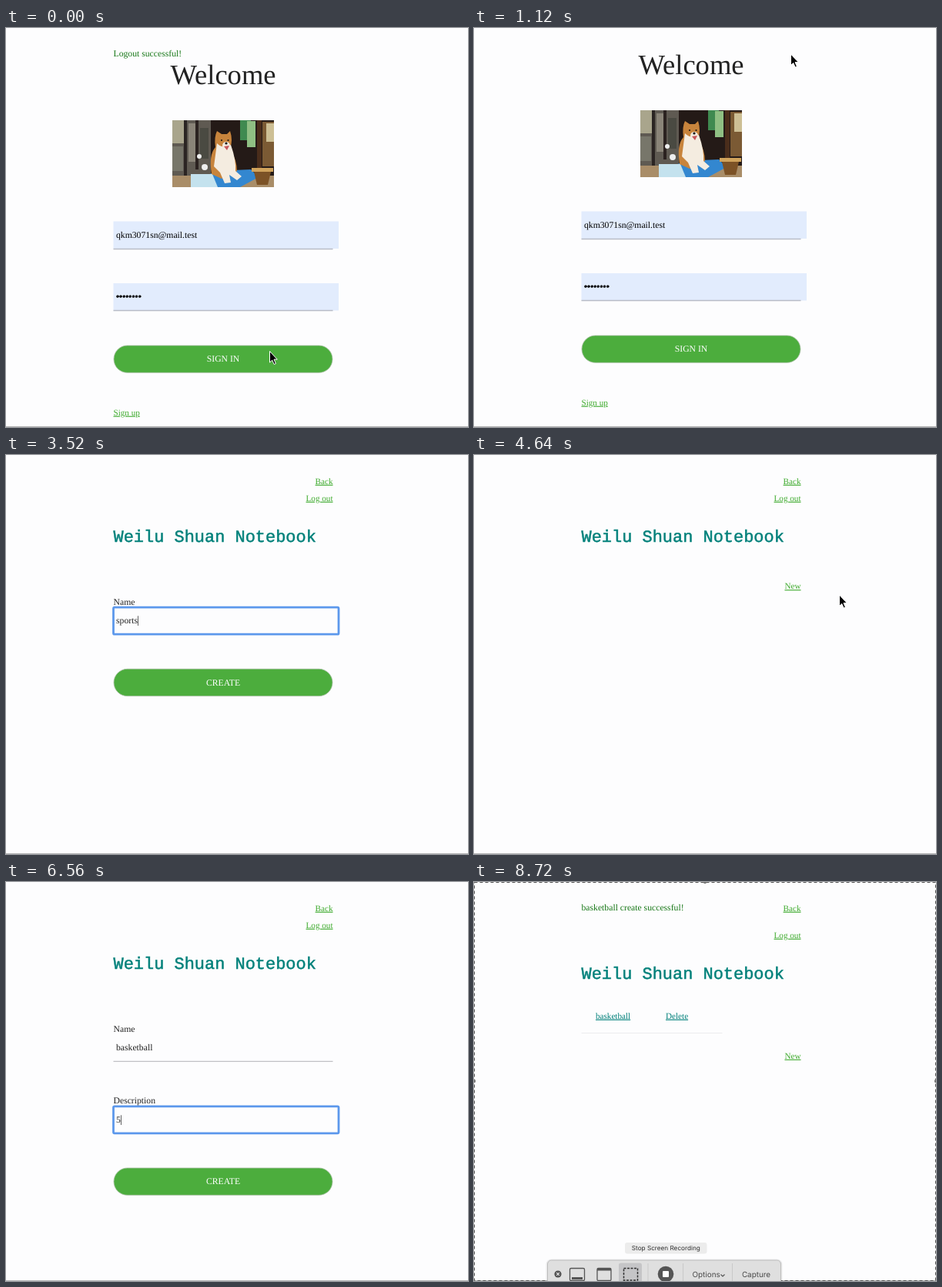
Recreate the animation shown at these times as an HTML page. Size 600x519 px, loop 8.8 s.

```html
<!DOCTYPE html>
<html lang="en">
<head>
<meta charset="utf-8">
<title>Notebook demo</title>
<style>
html, body { margin: 0; width: 100%; height: 100%; overflow: hidden; background: #fdfdfe; }
svg { display: block; width: 100vw; height: 100vh; }
text { font: 11.7px "Liberation Serif", "Times New Roman", serif; fill: #222; text-rendering: geometricPrecision; white-space: pre; }
.h1 { font-size: 36.6px; }
.mono { font: 21.95px "Liberation Mono", "Courier New", monospace; fill: #00807a; stroke: #00807a; stroke-width: .5px; }
.ui { font: 9.9px Inter, Roboto, sans-serif; fill: #4a4a4a; }
.tip { font: 8.2px Inter, Roboto, sans-serif; fill: #333; }
.link { font-size: 11.15px; fill: #3fab2e; text-decoration: underline; }
.teal { fill: #00807a; }
.flash { fill: #187818; }
.auto { fill: #000; }
.dots { fill: #000; stroke: #000; stroke-width: .7px; }
.white { fill: #fff; }
.mid { text-anchor: middle; }
.end { text-anchor: end; }
</style>
</head>
<body>
<svg viewBox="0 0 600 519" preserveAspectRatio="none">
  <defs>
    <clipPath id="frame"><rect x="216" y="120" width="132" height="87"/></clipPath>
    <g id="arrow" stroke="#fff" stroke-width="1" stroke-linejoin="round">
      <path d="M.5 0V14.500L3.700 11.500L6.200 17L8.400 16L6 10.600H10.300Z" fill="#000"/>
    </g>
    <g id="hand" stroke="#000" stroke-linejoin="round">
      <path d="M-1.5 .5Q0 -2 1.5 .5L3 4Q5 0 7 2Q9 1 9.5 4Q11 6 10 10L8.5 15H0Q-2 11-5.500 8.500Q-6 6-3 7L-.5 8.500L-3 2Q-3.500 0-1.500 .5Z" fill="#fff"/>
      <path d="M2 8V12M4.500 8V12M7 8V12" stroke-width=".9"/>
    </g>
    <g id="beam" fill="none" stroke="#222" stroke-width="1.3">
      <path d="M-3.500-7.500Q0-7.500 0-5Q0-7.500 3.500-7.500M0-5V6M-3.500 8Q0 8 0 5.500Q0 8 3.500 8M-2 3H2"/>
    </g>
  </defs>
  <g id="page"></g>
  <path d="M0 518.5H600" stroke="#b4b4b4"/>
  <g id="panel"></g>
  <use id="pointer"/>
</svg>
<script>
const LOOP = 8800, STEP = 80;
const $ = id => document.getElementById(id);
const text = (x, y, s, cls = '') => `<text x="${x}" y="${y}" class="${cls}">${s}</text>`;
const rect = (x, y, w, h, fill, more = '') =>
  `<rect x="${x}" y="${y}" width="${w}" height="${h}" fill="${fill}" ${more}/>`;
const path = (d, fill, stroke = 'none', more = '') =>
  `<path d="${d}" fill="${fill}" stroke="${stroke}" ${more}/>`;
const dot = (x, y, r, fill) => `<circle cx="${x}" cy="${y}" r="${r}" fill="${fill}"/>`;
const rule = (y, color = '#c6c6ca') => path(`M139.500 ${y}H424.500`, 'none', color, 'stroke-width="1.3"');
const ring = (x, y, w, h) => rect(x, y, w, h, 'none', 'rx="1.5" stroke="#5c98ec" stroke-width="2.8"');
const right = (y, s) => text(424.5, y - .3, s, 'link end');
const button = (y, s, focus) =>
  rect(140, y, 284, 35.3, '#4cad3d', 'rx="17.65" stroke="#a9bfa5" stroke-width=".8"') +
  text(282, y + 21.3, s, 'white mid') + (focus ? ring(137.5, y - 2.5, 289, 40.5) : '');

// Labelled input whose label baseline is y
function field(y, label, value = '', focus = false) {
  const caret = focus ? '<tspan dx="-.8" style="font-size:14px">|</tspan>' : '';
  return text(139.5, y, label) + rule(y + 38.8, '#c0c0c4') +
    (focus ? ring(139.5, y + 3.7, 292.5, 35) : '') + text(143, y + 24.7, value + caret);
}

const photo = `<g clip-path="url(#frame)">` +
  rect(216, 120, 132, 87, '#241a17') +
  rect(216, 120, 50, 87, '#5f5a52') + rect(216, 120, 15, 30, '#a9a58c') +
  rect(231, 120, 4, 72, '#2b2523') + rect(237, 124, 9, 50, '#8a8478') + rect(246, 120, 4, 64, '#2b2220') +
  rect(252, 130, 11, 40, '#4a4a42') + rect(216, 154, 14, 32, '#77766a') +
  rect(304, 120, 14, 26, '#3f8a50') + rect(313, 121, 11, 34, '#8fbf83') +
  rect(326, 120, 6, 66, '#4a2d1b') + rect(333, 122, 15, 58, '#7b5a34') + rect(338, 124, 10, 24, '#cdbf95') +
  rect(216, 192, 132, 15, '#a98d68') +
  path('M246 200L272 186L318 184L328 194L304 207H246Z', '#3387d0') +
  path('M240 190L268 190L275 207H240Z', '#c4e2ee') +
  path('M267 190Q263 165 272 155Q270 142 274 134L280 138L287 138L291 134Q295 146 291 157Q300 172 300 186L280 196Z', '#c8843c') +
  path('M274 150Q282 158 292 152Q299 172 298 186L306 193L300 198L290 191L292 201L284 202L278 188L270 180Z', '#f4ece0') +
  dot(286, 153, 5, '#f4ece0') + dot(280, 146, 1, '#111') + dot(288.5, 146, 1, '#111') + dot(286, 150, 1.6, '#111') +
  path('M283 154L290 153L287 159Z', '#c7565b') +
  path('M322 187H344L340 204H326Z', '#7c5226') + path('M319 182H347V187H319Z', '#d0a35c') +
  dot(251, 167, 3, '#eee') + dot(258, 181, 4, '#eee') + '</g>';

const login = flash => (flash ? text(139.5, 37, flash, 'flash') : '') +
  `<g transform="translate(0 ${flash ? 0 : -13})">` +
  text(282, 72.9, 'Welcome', 'h1 mid') + photo +
  rect(139.5, 251.5, 292.5, 35.5, '#e2ecfd') + rule(287.5, '#b8bcc6') + text(143, 272.7, 'qkm3071sn@mail.test', 'auto') +
  rect(139.5, 332, 292.5, 35.5, '#e2ecfd') + rule(367.5, '#b8bcc6') + text(143, 352.7, '•'.repeat(8), 'dots') +
  button(413, 'SIGN IN') + text(139.5, 503.7, 'Sign up', 'link') + '</g>';

const signup = () => text(268.7, 59.9, 'Sign up User', 'h1 mid') + right(38, 'Home') +
  ['Name', 'Email', 'Password', 'Confirm Password'].map((s, i) =>
    text(139.5, 146.5 + i * 93.6, s) + rule(184.8 + i * 93.6)).join('') +
  button(511, '');

const title = y => text(139.5, y - .3, 'Weilu Shuan Notebook', 'mono');

function list(flash, back, item) {
  const y = flash ? 73 : 60;
  return (flash ? text(139.5, 37, flash, 'flash') : '') + (back ? right(38, 'Back') : '') +
    right(y, 'Log out') + title(y + 53) +
    (item ? text(158, y + 104.7, item, 'link teal') + text(249, y + 104.7, 'Delete', 'link teal') +
      path(`M139.500 ${y + 123.5}H322.500`, 'none', '#ececee') : '') +
    right(y + (item ? 157 : 114.5), 'New');
}

const form = body => right(38, 'Back') + right(60, 'Log out') + title(113) + body;

const typed = (s, t, start, step) => s.slice(0, Math.max(0, Math.floor((t - start) / step) + 1));

function page(t) {
  if (t < 400) return login('Logout successful!');
  if (t < 1120) return signup();
  if (t < 1600) return login('');
  if (t < 2160) return list('Login successful!');
  if (t < 3760) return form(
    field(194.5, 'Name', typed('sports', t, 2960, 112), t >= 2480 && t < 3680) +
    button(278.3, 'CREATE', t >= 3680));
  if (t < 4160) return list('sports create successful!', false, 'sports');
  if (t < 4880) return list('', true);
  if (t < 8000) return form(
    field(194.5, 'Name', typed('basketball', t, 5440, 80), t >= 5120 && t < 6240) +
    field(288.1, 'Description', typed('5pm 11/11', t, 6480, 120), t >= 6240 && t < 7920) +
    button(372, 'CREATE', t >= 7920));
  return list('basketball create successful!', true, 'basketball');
}

// Screen capture frame and toolbar
function panel(t) {
  if (t < 8400) return '';
  const dark = '#555', outline = `rx="1.5" stroke="${dark}" stroke-width="1.3"`;
  const knobs = [[300, 0], [0, 259], [600, 259]].map(([x, y]) => dot(x, y, 2.2, '#777')).join('');
  const split = [226, 271.5, 335.5].map(x => path(`M${x} 496V519`, 'none', '#c9c9c9')).join('');
  return rect(.5, .5, 599, 518, 'none', 'stroke="#555" stroke-dasharray="4 3"') + knobs +
    rect(93.5, 490.5, 307, 44, '#000', 'rx="7" opacity=".07"') +
    rect(95.5, 492, 303, 40, '#dfdfdf', 'rx="5" stroke="#bcbcbc"') + split + dot(109, 510, 4.6, dark) +
    path('M107.200 508.200L110.800 511.800M110.800 508.200L107.200 511.800', 'none', '#eee', 'stroke-width="1.1"') +
    rect(124.5, 502.5, 19, 16, 'none', outline) + rect(127, 514, 14, 3, dark) +
    rect(160, 502.5, 18, 16, 'none', outline) + rect(160, 502.5, 18, 3, dark) +
    rect(188, 495.5, 30, 28, '#c5c5c7', 'rx="3"') +
    rect(194.5, 502.5, 18, 15.5, 'none', 'stroke="#333" stroke-width="1.5" stroke-dasharray="3 1.5"') +
    dot(249, 510, 10.3, dark) + rect(245, 506, 8, 8, '#fff', 'rx="1"') +
    text(283.5, 514, 'Options', 'ui') + path('M320.500 510.500L323 513L325.500 510.500', 'none', dark, 'stroke-width="1.2"') +
    text(366.5, 514, 'Capture', 'ui mid') +
    (t >= 8560 ? rect(196, 469, 106.5, 14.5, '#ececec', 'rx="3"') + text(249.3, 479.2, 'Stop Screen Recording', 'tip mid') : '');
}

// Pointer stops: time, x, y, shape kept until the next stop
const stops = [
  [0, 342, 420.5, 'arrow'], [80, 342, 420.5, 'arrow'], [240, 126, 482, 'arrow'], [320, 152, 499, 'hand'],
  [400, 152, 499, 'arrow'], [640, 380.5, 194, 'beam'], [720, 394, 110, 'arrow'], [880, 411, 34, 'hand'],
  [1120, 411, 34, 'arrow'], [1200, 484, 70, 'arrow'], [1520, 342, 407, 'arrow'], [1680, 342, 407, 'arrow'],
  [1920, 411, 180.5, 'hand'], [2160, 411, 180.5, 'arrow'], [2400, 330, 215, 'beam'], [2960, 330, 215, ''],
  [3760, 330, 215, 'arrow'], [4000, 168, 175, 'hand'], [4160, 168, 175, 'arrow'], [4560, 426, 190, 'arrow'],
  [4640, 474, 182, 'arrow'], [4800, 411, 168, 'hand'], [4880, 411, 168, 'arrow'], [5120, 330, 215, 'beam'],
  [5440, 330, 215, ''], [LOOP, 330, 215, '']
];

function movePointer(t) {
  const i = stops.findIndex(s => s[0] > t) - 1;
  const [t0, x0, y0, shape] = stops[i], [t1, x1, y1] = stops[i + 1];
  const k = (t - t0) / (t1 - t0), e = k * k * (3 - 2 * k);
  $('pointer').setAttribute('href', shape ? '#' + shape : '');
  $('pointer').setAttribute('transform', `translate(${x0 + (x1 - x0) * e} ${y0 + (y1 - y0) * e})`);
}

let last = -1;
const begin = performance.now();
function draw() {
  const t = Math.floor((performance.now() - begin) % LOOP / STEP) * STEP;
  if (t !== last) {
    last = t;
    $('page').innerHTML = page(t);
    $('panel').innerHTML = panel(t);
    movePointer(t);
  }
  requestAnimationFrame(draw);
}
draw();
</script>
</body>
</html>
```
